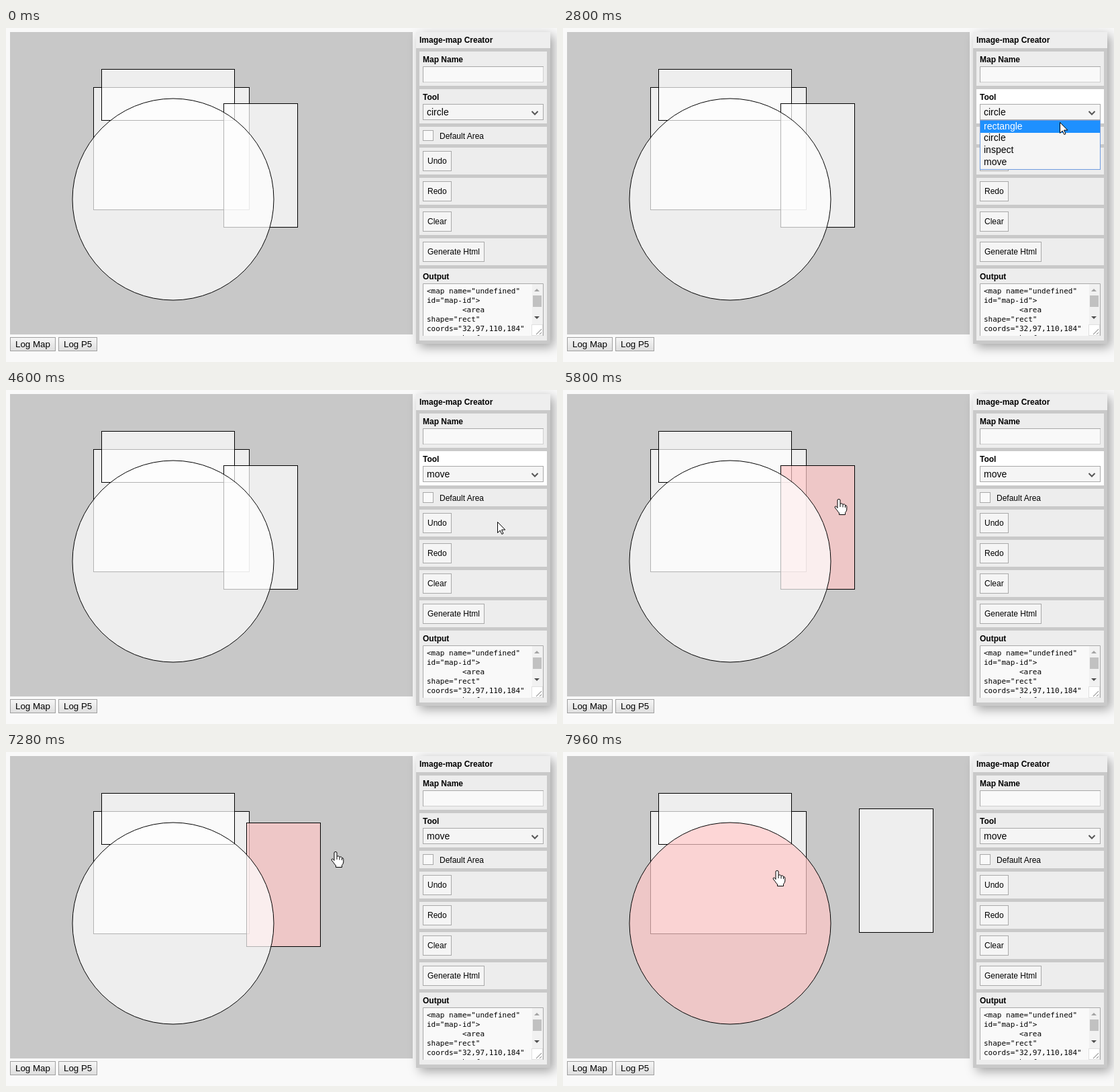
Animation of 821x497 px, one loop 8 s. Source, as an HTML page:

```html
<!DOCTYPE html>
<html lang="en">
<head>
<meta charset="utf-8">
<title>Image-map editor</title>
<style>
  html, body { margin: 0; width: 100%; height: 100%; overflow: hidden; background: #f9f9f9; }
  svg { display: block; }
  text { font: 12px "Liberation Sans", Arial, sans-serif; white-space: pre; }
  .bold { font-weight: bold; }
  .field { font-size: 14px; }
  .native { font-size: 13.333px; }
  .code { font: 11px "DejaVu Sans Mono", monospace; }
  #panel { filter: drop-shadow(5px 5px 8px rgba(0, 0, 0, .35)); }
  #areas * { stroke: #000; }
  #cursor path { fill: #fff; stroke: #000; stroke-linejoin: round; }
</style>
</head>
<body>
<svg id="stage" width="821" height="497" viewBox="0 0 821 497"></svg>
<script>
const LOOP = 8000, STEP = 40;
const OPEN = 1920, CHOOSE = 4600, PRESS = 6920, DRAG_START = 7120, DRAG_END = 7440, RELEASE = 7800;
const OPTIONS = ['rectangle', 'circle', 'inspect', 'move'];
const WHITE = 'rgba(255,255,255,.7)', PINK = 'rgba(255,200,200,.7)';

// Pointer tip: time, x, y
const TRACK = [
  [680, 840, 50], [720, 815, 63], [840, 785, 85], [960, 763, 105], [1160, 747, 122],
  [2560, 747, 122], [2720, 742, 135], [2800, 740, 140], [3080, 737, 160], [3400, 733, 190],
  [3440, 733, 190], [3560, 732, 196],
  [5320, 732, 196], [5360, 718, 194], [5440, 650, 186], [5560, 510, 172], [5680, 440, 165], [5800, 411, 162],
  [DRAG_START, 411, 162], [7200, 425, 160], [7240, 445, 155], [7280, 491, 148], [7360, 519, 137], [DRAG_END, 528, 134],
  [7760, 528, 134], [7800, 507, 138], [7840, 455, 148], [7880, 398, 160], [7920, 346, 170], [7960, 319, 176]
];

const box = (x, y, w, h, fill, extra = '') =>
  `<rect x="${x}" y="${y}" width="${w}" height="${h}" fill="${fill}" ${extra}/>`;
const framed = (x, y, w, h, fill, stroke = '#a9a9a9', extra = '') =>
  box(x + .5, y + .5, w - 1, h - 1, fill, `stroke="${stroke}" ${extra}`);
const label = (x, y, text, kind = '', extra = '') =>
  `<text x="${x}" y="${y}" class="${kind}" ${extra}>${text.replace(/</g, '&lt;')}</text>`;
const line = (d, stroke, width = 1) =>
  `<path d="${d}" fill="none" stroke="${stroke}" stroke-width="${width}"/>`;
const section = (y, h, extra) => box(616, y, 190, h, '#ededed', extra);
const button = (y, w, text) =>
  section(y, 40) + framed(621, y + 5, w, 30, '#f5f5f5') + label(628, y + 24, text);
const nativeButton = (x, w, text) =>
  framed(x, 460, w, 21, 'url(#sheen)', '#a0a0a0') + label(x + 8, 475, text, 'native');
const inset = (x, y, w, h) =>
  framed(x, y, w, h, '#f9f9f9', '#d0d0d0') + line(`M${x + .5} ${y + h}V${y + .5}H${x + w}`, '#a9a9a9');

const outputLines = ['<map name="undefined"', 'id="map-id">', '        <area', 'shape="rect"',
  'coords="32,97,110,184"', '        href'];
const output = section(358, 107) + label(621, 374, 'Output', 'bold') +
  box(621, 380, 180, 78, '#f9f9f9') + line('M621.5 458V380.5H800.5V458', '#a9a9a9') +
  `<g clip-path="url(#outputClip)">` +
  outputLines.map((text, i) => label(627, 395 + 14 * i, text, 'code')).join('') + '</g>' +
  box(784, 381, 16, 60, '#f1f1f1') + box(785, 398, 13, 17, '#c1c1c1') +
  '<path d="M787 392h8l-4-4z" fill="#a3a3a3"/><path d="M787 429h8l-4 4z" fill="#505050"/>' +
  framed(783, 441, 17, 17, '#fff', '#e0e0e0') + line('M790 456l8-8M795 456l3-3', '#777');

const dropdown = framed(621, 137, 180, 74, '#f5f5f5', '#6f9be0') + box(622, 138, 178, 18, '#1e90ff', 'id="highlight"') +
  OPTIONS.map((text, i) => label(627, Math.floor(151 + 17.8 * i), text, 'field option')).join('');

const arrow = 'M.5.5V16.5L4.2 13L6.8 18.5L9 17.5L6.5 12H11.8Z';
const hand = 'M-2 2Q-2 .5 0 .5Q2 .5 2 2V7.5Q3 6.6 4.5 7Q5.8 7.3 6 8.4Q7.2 7.6 8.6 8.2Q9.4 8.6 9.5 9.6' +
  'Q11.8 9.4 11.8 11.5V16Q11.5 18.5 9.5 20.5V23.5H.5V21Q-1.5 19-3 16.5L-5.8 13Q-6.3 11-4.5 11Q-3.2 11.4-2 13.5Z' +
  'M2 7.5V12M6 8.4V12.5M9.5 9.6V13';

document.getElementById('stage').innerHTML = `
  <defs>
    <linearGradient id="sheen" x2="0" y2="1"><stop stop-color="#f6f6f6"/><stop offset="1" stop-color="#dedede"/></linearGradient>
    <clipPath id="outputClip">${box(622, 381, 161, 77, '#000')}</clipPath>
  </defs>
  ${box(6, 6, 600, 450, '#c8c8c8')}
  <g id="areas">
    ${box(130.5, 88.5, 232, 182, WHITE)}
    ${box(142.5, 61.5, 198, 76, WHITE)}
    ${box(324.5, 112.5, 110, 184, WHITE)}
    <circle cx="249" cy="255" r="150"/>
  </g>
  ${nativeButton(6, 68, 'Log Map')}${nativeButton(78, 58, 'Log P5')}
  ${box(611, 6, 200, 464, '#c9c9c9', 'id="panel"')}
  ${box(611, 6, 200, 24, '#eee')}${label(616, 22, 'Image-map Creator', 'bold')}
  ${section(35, 51)}${label(621, 51, 'Map Name', 'bold')}${inset(621, 57, 180, 24)}
  ${section(91, 51, 'id="tool"')}${label(621, 107, 'Tool', 'bold')}
  ${framed(621, 113, 180, 24, '#f5f5f5')}${label(627, 130, 'circle', 'field', 'id="choice"')}
  ${line('M783.5 124l4.5 4.5l4.5-4.5', '#555', 2)}
  ${section(147, 26)}${framed(621, 152, 16, 16, '#f9f9f9')}${label(646, 165, 'Default Area')}
  ${button(178, 43, 'Undo')}${button(223, 43, 'Redo')}${button(268, 43, 'Clear')}${button(313, 92, 'Generate Html')}
  ${output}
  <g id="dropdown">${dropdown}</g>
  <g id="cursor"><path/></g>`;

const get = id => document.getElementById(id);
const areas = [...get('areas').children];
const options = [...document.querySelectorAll('.option')];
const pointerShape = get('cursor').firstElementChild;

function pointerAt(t) {
  const i = TRACK.findIndex(key => key[0] > t);
  if (i === 0) return TRACK[0].slice(1);
  if (i < 0) return TRACK.at(-1).slice(1);
  const [t0, x0, y0] = TRACK[i - 1], [t1, x1, y1] = TRACK[i];
  const k = (t - t0) / (t1 - t0);
  return [Math.round(x0 + (x1 - x0) * k), Math.round(y0 + (y1 - y0) * k)];
}

function hitArea(x, y, dx, dy) {
  const inside = (left, top, w, h) => x >= left && x <= left + w && y >= top && y <= top + h;
  if (Math.hypot(x - 249, y - 255) < 150) return 3;
  if (inside(324 + dx, 112 + dy, 110, 184)) return 2;
  if (inside(142, 61, 198, 76)) return 1;
  return inside(130, 88, 232, 182) ? 0 : -1;
}

function render(t) {
  const [x, y] = pointerAt(t);

  // The dragged area trails the pointer by one step.
  const [dragX, dragY] = pointerAt(Math.min(Math.max(t - STEP, DRAG_START), DRAG_END));
  const dx = dragX - 411, dy = dragY - 162;
  areas[2].setAttribute('transform', `translate(${dx} ${dy})`);

  const dragging = t >= PRESS && t < RELEASE - STEP;
  const hovered = t < CHOOSE ? -1 : dragging ? 2 : hitArea(x, y, dx, dy);
  areas.forEach((area, i) => area.setAttribute('fill', i === hovered ? PINK : WHITE));

  get('tool').setAttribute('fill', t >= OPEN && t < PRESS ? '#fff' : '#ededed');
  get('choice').textContent = t < CHOOSE ? 'circle' : 'move';
  get('dropdown').style.display = t >= OPEN && t < CHOOSE ? '' : 'none';
  const row = y < 138 ? 1 : Math.min(3, Math.floor((y - 138) / 18));
  get('highlight').setAttribute('y', 138 + 18 * row);
  options.forEach((option, i) => option.setAttribute('fill', i === row ? '#fff' : '#000'));

  pointerShape.setAttribute('d', hovered < 0 ? arrow : hand);
  get('cursor').setAttribute('transform', `translate(${x} ${y})`);
}

function tick() {
  render(Math.floor(performance.now() % LOOP / STEP) * STEP);
  requestAnimationFrame(tick);
}
tick();
</script>
</body>
</html>
```
